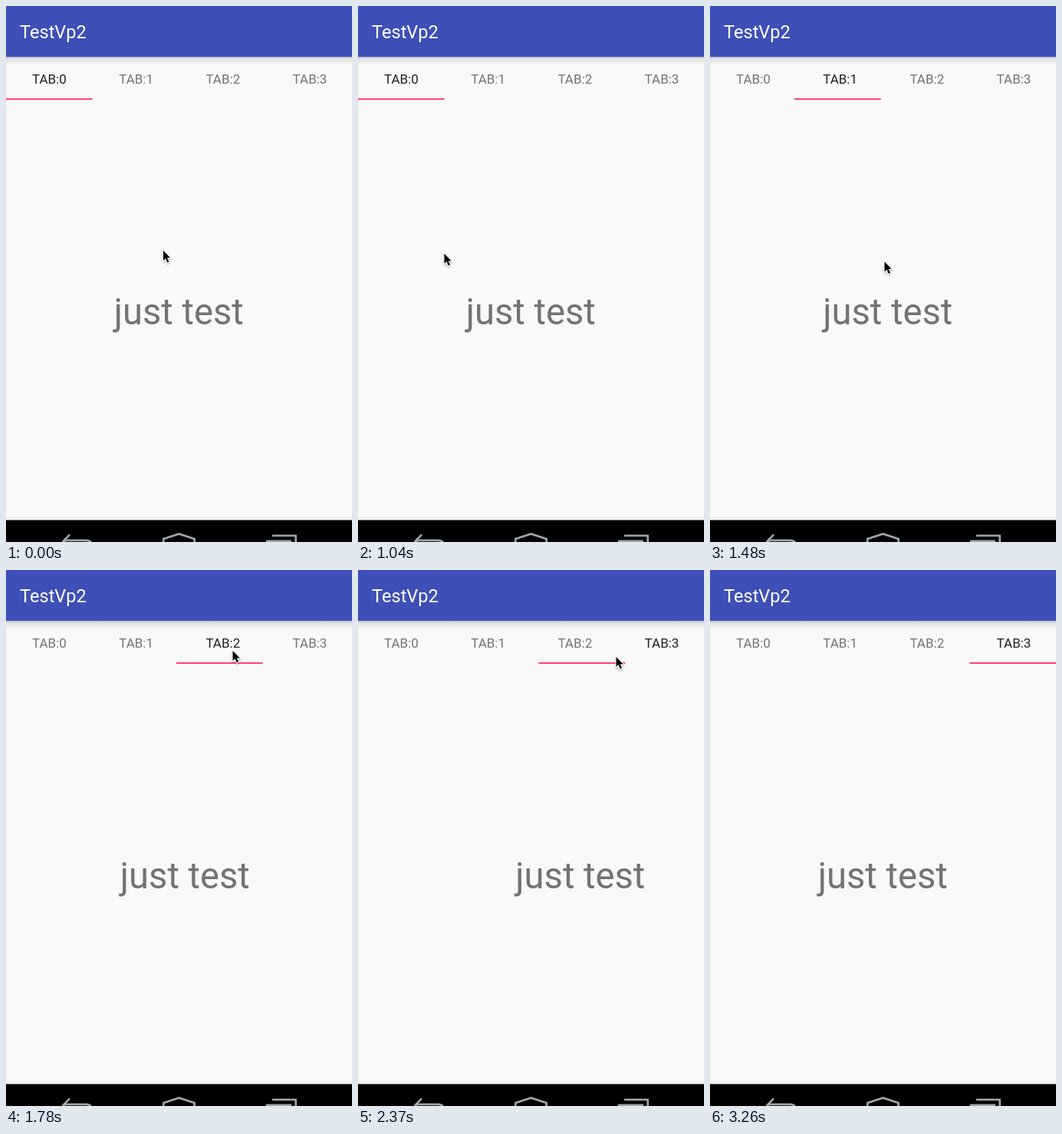
An HTML page that plays this animation: 451 px wide and 697 px high, repeating every 3.6 s.

```html
<!DOCTYPE html>
<html lang="en">
<head>
<meta charset="utf-8">
<title>Tabs with pager</title>
<style>
  html, body { margin: 0; width: 100%; height: 100%; overflow: hidden; background: #f9f9f9; }
  svg { display: block; width: 451px; height: 697px; font-family: Roboto, sans-serif; }
  .tab { font-size: 17px; text-anchor: middle; fill: #757575; }
  .tab.selected { fill: #212121; }
  .page { font-size: 47.2px; text-anchor: middle; fill: #737373; }
  .nav { fill: none; stroke: #a5a5a5; stroke-width: 2.6; }
</style>
</head>
<body>
<svg viewBox="0 0 451 697">
  <defs>
    <linearGradient id="shade" x2="0" y2="1">
      <stop offset="0" stop-color="#a9abb8"/>
      <stop offset=".2" stop-color="#dedede"/>
      <stop offset=".9" stop-color="#f3f3f3"/>
      <stop offset="1" stop-color="#f9f9f9"/>
    </linearGradient>
    <filter id="soft" x="-50%" y="-50%" width="200%" height="200%">
      <feDropShadow dx="0" dy="1.2" stdDeviation=".9" flood-opacity=".4"/>
    </filter>
  </defs>

  <rect width="451" height="697" fill="#f9f9f9"/>
  <rect y="66" width="451" height="10" fill="url(#shade)"/>
  <rect width="451" height="66" fill="#3e4fb7"/>
  <text x="18" y="42" font-size="23.6" fill="#fff">TestVp2</text>

  <rect id="ripple" x="338.5" y="68" width="112.5" height="54" opacity=".08"/>
  <g id="tabs"></g>
  <rect id="indicator" y="120" width="112.75" height="2" fill="#ff4081"/>
  <g id="pages"></g>

  <rect y="664" width="451" height="5" fill="#f5f5f5"/>
  <rect y="668.5" width="451" height="29"/>
  <g class="nav" transform="translate(0 -.6)">
    <path d="M83 688L74.500 696.500L80 702M75 695.500H104Q111 695.500 112 701"/>
    <path d="M205.300 700V693.500L225.500 687L245.700 693.500V700"/>
    <path d="M340.300 700V696.300H370.700V700M347 689.300H377.700V700"/>
  </g>

  <path id="cursor" d="M0 0V13L3 10.300L5.300 15.500L7.500 14.600L5.200 9.500H9.200Z"
    stroke="#fff" stroke-width="1.8" paint-order="stroke" filter="url(#soft)"/>
</svg>
<script>
  const LOOP = 3600, STEP = 148, WIDTH = 451, TAB = WIDTH / 4;
  const RIPPLE_STEP = 15;
  const $ = id => document.getElementById(id);

  // Turning points of the pointer: [step, x, y]
  const path = [
    [0, 205, 318], [2, 207.5, 311], [4, 308.5, 318], [6, 288.5, 318.5],
    [7, 112.5, 322], [10, 227.5, 332.5], [11, 120, 325], [12, 295.5, 105],
    [14, 377, 83], [16, 336.5, 113], [18, 309.5, 310], [19, 428.5, 623], [22, 452, 724]
  ];

  // Each swipe settles the page and, slightly later, the indicator.
  const swipes = [
    { page: { start: 7.25, length: 4.81 }, bar: { start: 7.47, length: 4.81 } },
    { page: { start: 10.69, length: 2.37 }, bar: { start: 10.82, length: 2.37 } },
    { page: { start: 15.43, length: 1.77 }, bar: { start: 15.94, length: 3.3 } }
  ];

  const clamp = v => Math.min(1, Math.max(0, v));
  const easeOutQuint = p => 1 - (1 - p) ** 5;
  const settle = (part, step) => swipes.reduce((sum, swipe) =>
    sum + easeOutQuint(clamp((step - swipe[part].start) / swipe[part].length)), 0);

  function pointerAt(step) {
    const next = path.findIndex(point => point[0] > step);
    if (next < 0) return path.at(-1).slice(1);
    const [from, x, y] = path[next - 1];
    const [to, nextX, nextY] = path[next];
    const p = (step - from) / (to - from);
    return [x + (nextX - x) * p, y + (nextY - y) * p];
  }

  function addText(parent, className, text, x, y) {
    const node = document.createElementNS('http://www.w3.org/2000/svg', 'text');
    node.setAttribute('class', className);
    node.setAttribute('x', x);
    node.setAttribute('y', y);
    node.textContent = text;
    return $(parent).appendChild(node);
  }

  const tabs = [0, 1, 2, 3].map(i => {
    addText('pages', 'page', 'just test', WIDTH * i + 225.2, 414);
    return addText('tabs', 'tab', 'TAB:' + i, 56.4 + 113.2 * i, 100.5);
  });

  const move = (id, x, y = 0) => $(id).setAttribute('transform', `translate(${x} ${y})`);

  function draw(time) {
    const step = Math.floor((time % LOOP + 5) / STEP);
    const page = settle('page', step);
    const selected = Math.floor(page + 0.45);
    move('cursor', ...pointerAt(step));
    move('indicator', TAB * settle('bar', step));
    move('pages', -WIDTH * page);
    tabs.forEach((tab, i) => tab.classList.toggle('selected', i === selected));
    $('ripple').style.display = step === RIPPLE_STEP ? '' : 'none';
  }

  const start = performance.now();
  function tick() {
    draw(performance.now() - start);
    requestAnimationFrame(tick);
  }
  tick();
</script>
</body>
</html>
```
